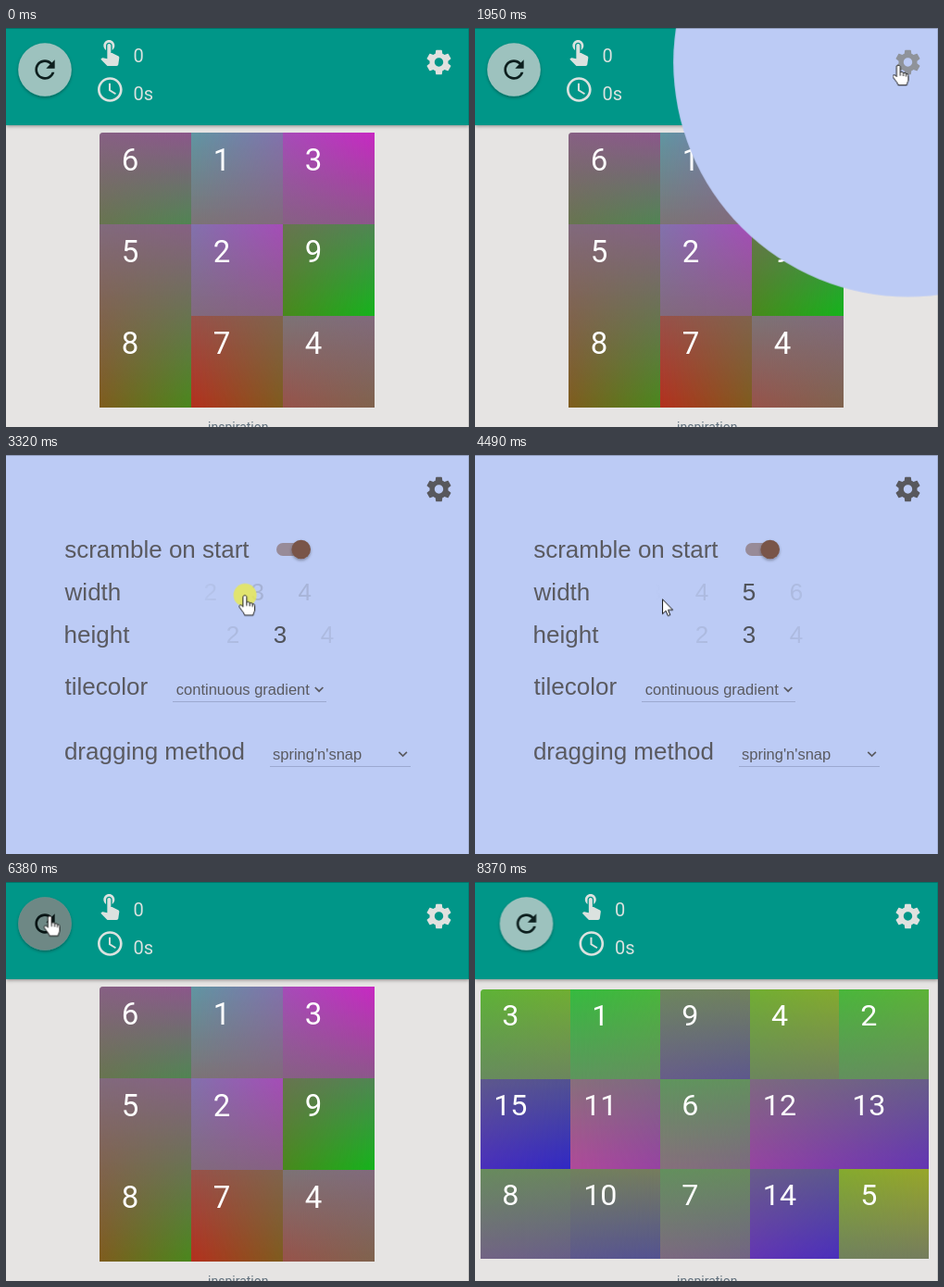
Animation, 500 px wide and 431 px high, one loop 8830 ms. Source, as an HTML page:

```html
<!DOCTYPE html>
<html lang="en">
<head>
<meta charset="utf-8">
<title>Sliding puzzle</title>
<style>
  html, body { margin: 0; width: 100%; height: 100%; overflow: hidden; background: #e6e4e3; }
  #stage { position: absolute; left: 0; top: 0; width: 500px; height: 431px; overflow: hidden; background: #e6e4e3; }
  svg { position: absolute; left: 0; top: 0; display: block; }
  .bar { position: absolute; left: 0; top: 0; width: 500px; height: 105px; background: #009688; box-shadow: 0 1px 4px rgba(0,0,0,.42); }
  .roboto { font-family: Roboto, sans-serif; }
  .arial { font-family: "Liberation Sans", Arial, sans-serif; fill: #5a5a60; }

  .board { position: absolute; overflow: hidden; border-radius: 4px 0 0 0; }
  .tile { position: absolute; overflow: hidden; }
  .tile i { position: absolute; }
  .tile .right { -webkit-mask-image: linear-gradient(to right, transparent, #000); mask-image: linear-gradient(to right, transparent, #000); }
  .tile b { position: absolute; left: 33.33%; top: 28.8%; transform: translate(-50%, -50%); line-height: 1; color: #fff; font-weight: 400; }

  .a { animation: 8830ms linear infinite; }
  .step { animation-timing-function: step-end; }
  #small { animation-name: before; }
  #large { animation-name: after; }
  #controls { animation-name: shift; }
  #ripple { animation-name: ripple; }
  #sheet { animation-name: sheet; transform-origin: 467.5px 37px; }
  #form { animation-name: form; }
  #gear { animation-name: gear; }
  .slide { animation-name: slide; }
  #old { animation-name: old; }
  #new { animation-name: new; }
  #cursor { animation-name: move; }
  #shown { animation-name: shown; }
  #press { animation-name: press; }
  #hand { animation-name: hand; }
  #arrow { animation-name: arrow; }

  @keyframes before { 0% { opacity: 1 } 72.9%, 100% { opacity: 0 } }
  @keyframes after { 0% { opacity: 0 } 72.9%, 100% { opacity: 1 } }
  @keyframes shift { 0% { transform: none } 72.9%, 100% { transform: translateX(13.5px) } }
  @keyframes ripple { 0%, 72% { opacity: 0 } 72.2%, 73.2% { opacity: .3 } 78.37%, 100% { opacity: 0 } }

  @keyframes sheet {
    0% { transform: scale(0) }
    20.951% { transform: scale(0); animation-timing-function: ease }
    26.047% { transform: scale(1) }
    59.841% { transform: scale(1); animation-timing-function: ease }
    64.938%, 100% { transform: scale(0) }
  }
  @keyframes form { 0%, 22.6% { opacity: 0 } 26.05%, 59.796% { opacity: 1 } 61.1%, 100% { opacity: 0 } }
  @keyframes gear {
    0%, 20.951% { fill: #e0e1df }
    22.084% { fill: #8f949b }
    23.4%, 59.796% { fill: #58585d }
    61.155% { fill: #b5b8b8 }
    61.9%, 100% { fill: #e0e1df }
  }
  @keyframes slide {
    0%, 36.127% { transform: none }
    37.599% { transform: translateX(-24px) }
    39.638% { transform: translateX(-74px); animation-timing-function: ease-out }
    45.866%, 100% { transform: translateX(-102px) }
  }
  @keyframes old { 0%, 36.127% { opacity: 1 } 37.5%, 100% { opacity: 0 } }
  @keyframes new { 0%, 46% { opacity: 0 } 49.04%, 100% { opacity: 1 } }

  @keyframes move {
    0%, 7.361% { transform: translate(424px, 383px); animation-timing-function: ease-in-out }
    16.535% { transform: translate(457.5px, 40px) }
    26.274% { transform: translate(457.5px, 40px); animation-timing-function: ease-in-out }
    30.804% { transform: translate(309px, 149px) }
    31.823%, 36.127% { transform: translate(301px, 148px) }
    37.599% { transform: translate(258.5px, 151.3px) }
    39.638% { transform: translate(200.5px, 156px) }
    50.6% { transform: translate(200.5px, 156px); animation-timing-function: ease-in-out }
    55.266% { transform: translate(457.5px, 36px) }
    62.967% { transform: translate(457.5px, 36px); animation-timing-function: ease-in-out }
    67.95% { transform: translate(47.5px, 36.5px) }
    82.65% { transform: translate(47.5px, 36.5px); animation-timing-function: step-end }
    82.66% { transform: translate(73.5px, 61px); animation-timing-function: ease-out }
    86.297% { transform: translate(404px, 268px) }
    90.034% { transform: translate(404px, 268px); animation-timing-function: ease-in }
    94.78%, 100% { transform: translate(449px, 431px) }
  }
  @keyframes shown { 0% { opacity: 0 } 7.361% { opacity: 1 } 94.78%, 100% { opacity: 0 } }
  @keyframes press {
    0% { opacity: 0 }
    18.8% { opacity: 1 } 20.951% { opacity: 0 }
    34.088% { opacity: 1 } 40.2% { opacity: 0 }
    57.191% { opacity: 1 } 59.796% { opacity: 0 }
    69.875% { opacity: 1 } 72%, 100% { opacity: 0 }
  }
  @keyframes hand {
    0% { opacity: 0 } 15.4% { opacity: 1 } 27.2% { opacity: 0 } 30.1% { opacity: 1 }
    40.2% { opacity: 0 } 54.5% { opacity: 1 } 64% { opacity: 0 } 67% { opacity: 1 } 83%, 100% { opacity: 0 }
  }
  @keyframes arrow {
    0% { opacity: 1 } 15.4% { opacity: 0 } 27.2% { opacity: 1 } 30.1% { opacity: 0 }
    40.2% { opacity: 1 } 54.5% { opacity: 0 } 64% { opacity: 1 } 67% { opacity: 0 } 83%, 100% { opacity: 1 }
  }
</style>
</head>
<body>
<div id="stage">
  <div class="bar"></div>
  <div id="small" class="board a step roboto"></div>
  <div id="large" class="board a step roboto"></div>

  <svg width="500" height="431">
    <defs>
      <filter id="lift" x="-30%" y="-30%" width="160%" height="170%">
        <feDropShadow dx="0" dy="1.5" stdDeviation="1.5" flood-opacity=".35"/>
      </filter>
      <linearGradient id="fall" gradientUnits="userSpaceOnUse" x1="194" x2="398" y1="0" y2="0">
        <stop offset="0" stop-color="#fff" stop-opacity="0"/>
        <stop offset=".5" stop-color="#fff" stop-opacity=".26"/>
        <stop offset="1" stop-color="#fff" stop-opacity="0"/>
      </linearGradient>
      <mask id="fade" maskUnits="userSpaceOnUse" x="194" y="130" width="160" height="90">
        <rect x="194" y="130" width="160" height="90" fill="url(#fall)"/>
      </mask>
    </defs>

    <text class="roboto" x="250.8" y="436" font-size="14" text-anchor="middle" fill="#5f6f7c">inspiration</text>

    <g id="controls" class="a step">
      <circle cx="42" cy="45" r="28.8" fill="#9dc2be" filter="url(#lift)"/>
      <path transform="translate(26 29) scale(1.3333)" fill="#0d1f1e" d="M17.65 6.35C16.2 4.9 14.21 4 12 4c-4.42 0-7.99 3.58-7.99 8s3.57 8 7.99 8c3.73 0 6.84-2.55 7.73-6h-2.08c-.82 2.33-3.04 4-5.65 4-3.31 0-6-2.69-6-6s2.69-6 6-6c1.66 0 3.14.69 4.22 1.78L13 11h7V4l-2.35 2.35z"/>
      <circle id="ripple" class="a" cx="42" cy="45" r="28.8"/>
      <g fill="#dbe2df" class="roboto" font-size="20">
        <path transform="translate(96 9) scale(1.3333)" d="M9 11.24V7.5C9 6.12 10.12 5 11.5 5S14 6.12 14 7.5v3.74c1.21-.81 2-2.18 2-3.74C16 5.01 13.99 3 11.5 3S7 5.01 7 7.5c0 1.56.79 2.93 2 3.74zm9.84 4.63l-4.54-2.26c-.17-.07-.35-.11-.54-.11H13v-6c0-.83-.67-1.5-1.5-1.5S10 6.67 10 7.5v10.74l-3.43-.72c-.08-.01-.15-.03-.24-.03-.31 0-.59.13-.79.33l-.79.8 4.94 4.94c.27.27.65.44 1.06.44h6.79c.75 0 1.33-.55 1.44-1.28l.75-5.27c.01-.07.02-.14.02-.2 0-.62-.38-1.16-.91-1.38z"/>
        <path transform="translate(96.3 50.5) scale(1.3333)" d="M11.99 2C6.47 2 2 6.48 2 12s4.47 10 9.99 10C17.52 22 22 17.52 22 12S17.52 2 11.99 2zM12 20c-4.42 0-8-3.58-8-8s3.58-8 8-8 8 3.58 8 8-3.58 8-8 8zm.5-13H11v6l5.25 3.15.75-1.23-4.5-2.67z"/>
        <text x="137.5" y="37">0</text>
        <text x="137.5" y="78">0s</text>
      </g>
    </g>

    <circle id="sheet" class="a" cx="467.5" cy="37" r="721" fill="#bccbf5"/>

    <g id="form" class="a arial" font-size="26">
      <text x="63.2" y="111">scramble on start</text>
      <text x="63.6" y="157">width</text>
      <text x="62.6" y="203">height</text>
      <text x="63.6" y="259">tilecolor</text>
      <text x="62.9" y="329">dragging method</text>

      <rect x="292" y="95" width="36" height="14" rx="7" fill="#988b98"/>
      <circle cx="318.7" cy="102" r="10.3" fill="#795548" filter="url(#lift)"/>

      <g text-anchor="middle" fill="#50535a">
        <g mask="url(#fade)">
          <g class="a slide">
            <text x="245" y="157">2</text><text x="296" y="157">3</text><text x="347" y="157">4</text>
            <text x="398" y="157">5</text><text x="449" y="157">6</text>
          </g>
          <text x="245" y="203">2</text><text x="347" y="203">4</text>
        </g>
        <g class="a slide">
          <text id="old" class="a" x="296" y="157">3</text>
          <text id="new" class="a" x="398" y="157">5</text>
        </g>
        <text x="296" y="203">3</text>
      </g>

      <g font-size="16.5">
        <text x="183.8" y="258.5">continuous gradient</text>
        <text x="288" y="328.5">spring'n'snap</text>
      </g>
      <path d="M180 266.5H346M285 336.5H437" stroke="#9ca9d0"/>
      <path d="M333.8 251l4.3 4.2 4.3-4.2M424.3 320.8l4.3 4.2 4.3-4.2" fill="none" stroke="#5a5a60" stroke-width="1.7"/>
    </g>

    <path id="gear" class="a" transform="translate(451.5 21) scale(1.3333)" d="M19.43 12.98c.04-.32.07-.64.07-.98s-.03-.66-.07-.98l2.11-1.65c.19-.15.24-.42.12-.64l-2-3.46c-.12-.22-.39-.3-.61-.22l-2.49 1c-.52-.4-1.08-.73-1.69-.98l-.38-2.65C14.46 2.18 14.25 2 14 2h-4c-.25 0-.46.18-.49.42l-.38 2.65c-.61.25-1.17.59-1.69.98l-2.49-1c-.23-.09-.49 0-.61.22l-2 3.46c-.13.22-.07.49.12.64l2.11 1.65c-.04.32-.07.65-.07.98s.03.66.07.98l-2.11 1.65c-.19.15-.24.42-.12.64l2 3.46c.12.22.39.3.61.22l2.49-1c.52.4 1.08.73 1.69.98l.38 2.65c.03.24.24.42.49.42h4c.25 0 .46-.18.49-.42l.38-2.65c.61-.25 1.17-.59 1.69-.98l2.49 1c.23.09.49 0 .61-.22l2-3.46c.12-.22.07-.49-.12-.64l-2.11-1.65zM12 15.5c-1.93 0-3.5-1.57-3.5-3.5s1.57-3.5 3.5-3.5 3.5 1.57 3.5 3.5-1.57 3.5-3.5 3.5z"/>

    <path d="M0 .5H500" stroke="#000" stroke-opacity=".22"/>
    <path d="M499.5 1V431" stroke="#000" stroke-opacity=".12"/>

    <g id="shown" class="a step">
      <g id="cursor" class="a">
        <circle id="press" class="a step" r="12.5" fill="#ecec46" fill-opacity=".77"/>
        <g fill="#fff" stroke="#111" stroke-linejoin="round">
          <path id="hand" class="a step" d="M-2.2 12.6V2.2C-2.2-.3 1.8-.3 1.8 2.2V8C2.3 6.9 5 7.1 5.1 8.8 5.8 7.9 8.1 8.3 8.1 9.8 9 9 10.5 9.8 10.5 11.4V16C10.5 18 8.8 19.4 8.8 21.8H-.5C-.8 19.6-2.8 17.8-6 13.2-7.2 11.2-4.6 9.8-3.3 11.4ZM1.8 8V11.6M5.1 8.8V12M8.1 9.8V12.6"/>
          <path id="arrow" class="a step" d="M.5.6V16.4L4.1 13 6.4 18.5 8.8 17.5 6.5 12.1H11.6Z"/>
        </g>
      </g>
    </g>
  </svg>
</div>
<script>
  // Each tile is a window onto one four-corner gradient, placed by its solved position.
  function build(id, left, top, size, cols, order, corners) {
    const board = document.getElementById(id);
    const edge = n => Math.round(n * size);
    const rows = order.length / cols;
    const w = edge(cols), h = edge(rows);
    const [tl, tr, bl, br] = corners;
    board.style.cssText = `left:${left}px;top:${top}px;width:${w}px;height:${h}px;font-size:${size / 3}px`;
    order.forEach((n, i) => {
      const c = i % cols, r = Math.floor(i / cols);
      const homeC = (n - 1) % cols, homeR = Math.floor((n - 1) / cols);
      const box = `left:${-edge(homeC)}px;top:${-edge(homeR)}px;width:${w}px;height:${h}px;`;
      const tile = document.createElement('div');
      tile.className = 'tile';
      tile.style.cssText = `left:${edge(c)}px;top:${edge(r)}px;width:${edge(c + 1) - edge(c)}px;height:${edge(r + 1) - edge(r)}px`;
      tile.innerHTML =
        `<i style="${box}background:linear-gradient(${tl},${bl})"></i>` +
        `<i class="right" style="${box}background:linear-gradient(${tr},${br})"></i><b>${n}</b>`;
      board.append(tile);
    });
  }

  build('small', 101, 113, 99, 3, [6, 1, 3, 5, 2, 9, 8, 7, 4],
    ['#6096a2', '#c828c2', '#b4301e', '#14b41c']);
  build('large', 6, 116, 96.85, 5, [3, 1, 9, 4, 2, 15, 11, 6, 12, 13, 8, 10, 7, 14, 5],
    ['#36bb40', '#98a62a', '#b04a9a', '#3028c4']);
</script>
</body>
</html>
```
